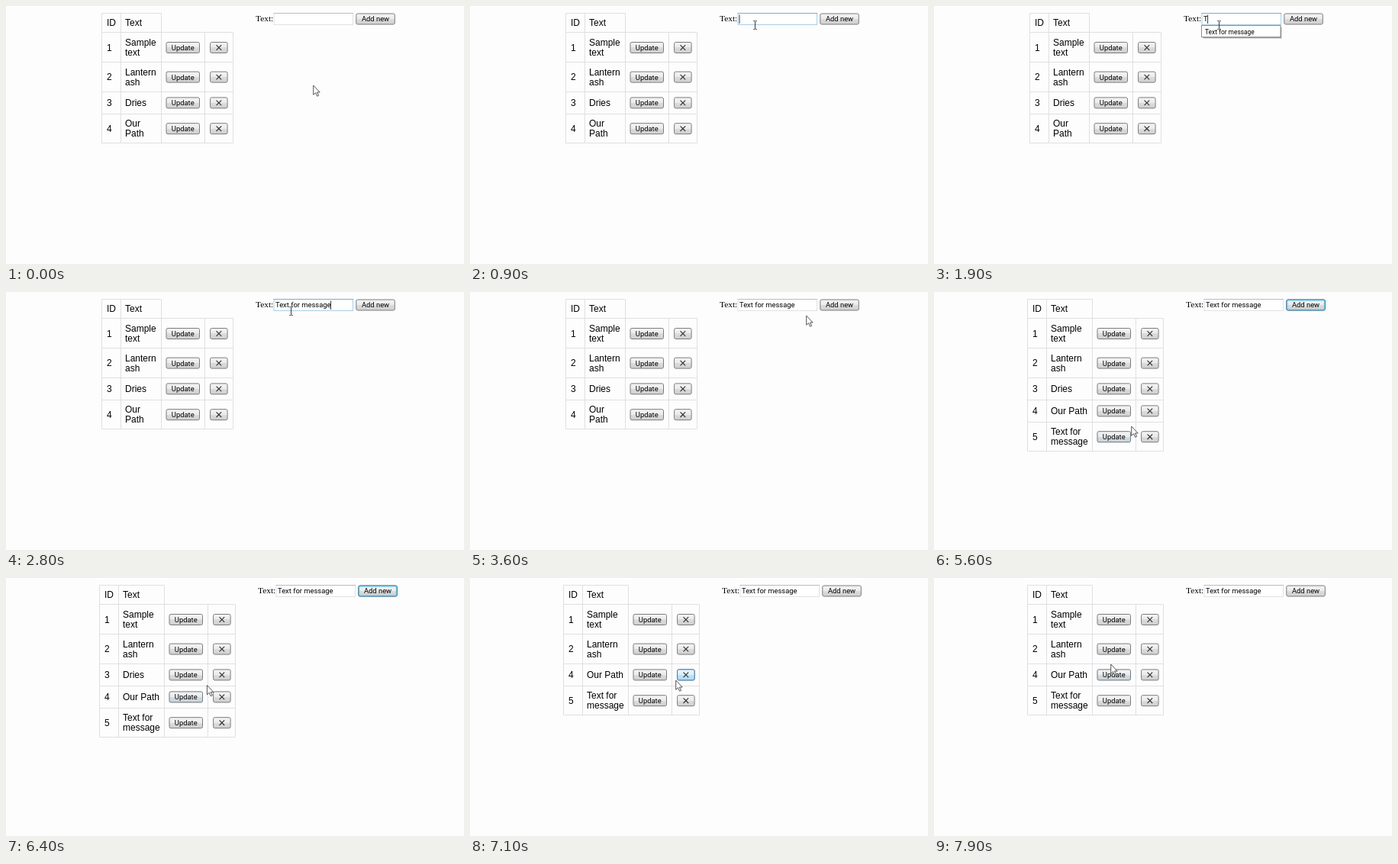
An HTML page for the animation above (8 s loop, 600x338 px).

```html
<!DOCTYPE html>
<html lang="en">
<head>
<meta charset="utf-8">
<style>
  html, body { margin: 0; width: 100%; height: 100%; overflow: hidden; background: #fefdfe; }
  svg { display: block; }
  text { white-space: pre; fill: #000; }
  .cell { font: 12px "Liberation Sans", Arial, sans-serif; }
  .ui { font: 9.4px Roboto, sans-serif; }
  .hint { font: 8.4px Roboto, sans-serif; }
  .label { font: 11.4px "Liberation Serif", "Times New Roman", serif; }
  .mid { text-anchor: middle; }
</style>
</head>
<body>
<svg width="600" height="338" viewBox="0 0 600 338">
  <defs>
    <linearGradient id="face" x2="0" y2="1">
      <stop stop-color="#f4f4f4"/><stop offset=".5" stop-color="#ebebeb"/>
      <stop offset=".5" stop-color="#dddddd"/><stop offset="1" stop-color="#cfcfcf"/>
    </linearGradient>
    <linearGradient id="hot" x2="0" y2="1">
      <stop stop-color="#eaf6fd"/><stop offset=".5" stop-color="#d9f0fc"/>
      <stop offset=".5" stop-color="#bee6fd"/><stop offset="1" stop-color="#a7d9f5"/>
    </linearGradient>
  </defs>
  <g id="scene"></g>
</svg>
<script>
const LOOP = 8000, TICK = 100;
const MESSAGE = 'Text for message';
const ADDED = 4200, REMOVED = 6900;
const scene = document.getElementById('scene');
const ruler = document.createElement('canvas').getContext('2d');

// Pointer path: time, x, y
const PATH = [
  [0, 403, 104], [500, 365, 29], [600, 365, 29], [900, 373, 25], [3400, 373, 25],
  [3600, 441, 31], [3700, 452, 28], [3900, 480, 19], [4200, 480, 19], [4500, 449, 27],
  [5000, 297, 115], [5400, 245, 184], [5600, 259, 176], [5900, 223, 177],
  [6600, 280, 126], [7000, 280, 128], [7100, 270, 134], [7700, 234, 122], [7900, 232, 113]
];
const TYPED = [[0, ''], [1800, 'T'], [2100, 'Te'], [2400, 'Tex'], [2600, 'Text'], [2800, MESSAGE]];

const within = (t, from, to) => t >= from && t < to;
const snap = v => Math.floor(v) + .5;

function pointer(t) {
  const i = PATH.findIndex(p => p[0] > t);
  if (i < 0) return PATH[PATH.length - 1].slice(1);
  if (i === 0) return PATH[0].slice(1);
  const [t0, x0, y0] = PATH[i - 1], [t1, x1, y1] = PATH[i];
  const k = (t - t0) / (t1 - t0);
  return [x0 + (x1 - x0) * k, y0 + (y1 - y0) * k];
}

const rect = (x, y, w, h, attrs) =>
  `<rect x="${x}" y="${y}" width="${w}" height="${h}" ${attrs}/>`;
const line = (d, color, width = 1) =>
  `<path d="${d}" fill="none" stroke="${color}" stroke-width="${width}"/>`;
const text = (x, y, s, cls) => `<text x="${x}" y="${y}" class="${cls}">${s}</text>`;

// Hover glow fades for two ticks after the pointer leaves
function glow(t, x, y, w, h) {
  const over = [1, .9, .15].map((level, i) => {
    const [px, py] = pointer(t - i * TICK);
    return px >= x && px <= x + w && py >= y && py <= y + h ? level : 0;
  });
  return Math.max(...over);
}

function button(t, x, cy, w, label, focused) {
  const y = cy - 7, h = 14, hot = glow(t, x, y, w, h);
  let s = rect(x, y, w, h, 'rx="2" fill="url(#face)" stroke="#7c7c7c"');
  if (hot) s += rect(x, y, w, h, `rx="2" fill="url(#hot)" stroke="#3c7fb1" opacity="${hot}"`);
  if (focused) {
    s += rect(x, y, w, h, 'rx="2" fill="none" stroke="#3c7fb1"') +
      rect(x + 1, y + 1, w - 2, h - 2, 'rx="1" fill="none" stroke="#5ccbef"');
  }
  const cx = x + w / 2;
  return s + (label
    ? text(cx, cy + 3.4, label, 'ui mid')
    : line(`M${cx - 3.3} ${cy - 3.3}l6.6 6.6m0 -6.6l-6.6 6.6`, '#333', 1.2));
}

function table(t) {
  const wide = t >= ADDED;
  const [x0, x1, x2, x3, x4] = wide ? [122.5, 147, 207, 264, 300.5] : [125.5, 150, 203, 260, 297];
  const rows = [
    [1, 'Sample', 'text'], [2, 'Lantern', 'ash'], [3, 'Dries'],
    wide ? [4, 'Our Path'] : [4, 'Our', 'Path']
  ];
  if (wide) rows.push([5, 'Text for', 'message']);
  if (t >= REMOVED) rows.splice(2, 1);

  const grid = (xs, y, h) => {
    const top = snap(y), bottom = snap(y + h), left = snap(xs[0]), right = snap(xs[xs.length - 1]);
    return line(`M${left} ${top}H${right}M${left} ${bottom}H${right}` +
      xs.map(x => `M${snap(x)} ${top}V${bottom}`).join(''), '#dfdfe2');
  };
  let s = grid([x0, x1, x2], 9, 25.8) +
    text(x0 + 6.5, 26, 'ID', 'cell') + text(x1 + 6, 26, 'Text', 'cell');
  let y = 34.8;
  for (const [id, ...words] of rows) {
    const h = words.length > 1 ? 38.6 : 29, mid = y + h / 2;
    s += grid([x0, x1, x2, x3, x4], y, h);
    s += text(x0 + 6.5, mid + 4.6, id, 'cell');
    words.forEach((word, i) => {
      s += text(x1 + 6, mid + 4.6 + 13 * (i - (words.length - 1) / 2), word, 'cell');
    });
    s += button(t, x2 + 7, mid + .4, 43.5, 'Update') + button(t, x3 + 7.6, mid + .4, 22.5);
    y += h;
  }
  return s;
}

function form(t) {
  const dx = t >= ADDED ? 3 : 0, x = 351 + dx;
  const active = within(t, 900, 3500);
  const typed = TYPED.filter(step => step[0] <= t).pop()[1];
  let s = text(327 + dx, 20.4, 'Text:', 'label');
  s += rect(x, 9.5, 103.5, 15, `fill="#fff" stroke="${active ? '#a9cde6' : '#e0e1e6'}"`);
  s += line(`M${x - .5} 9.5h104.5`, active ? '#79acd0' : '#b9bbc0');
  s += text(x + 2, 20.4, typed, 'ui');
  if (within(t, 900, 1500) || within(t, 1800, 3200)) {
    ruler.font = '9.4px Roboto, sans-serif';
    const caret = x + 2 + ruler.measureText(typed).width;
    s += line(`M${caret} 11.5v11.5`, '#222', .9);
  }
  if (within(t, 1800, 2800)) {
    s += rect(353, 28, 103, 15, 'fill="#000" opacity=".12"') +
      rect(352, 27, 103, 15, 'fill="#000" opacity=".3"') +
      rect(350.5, 25.5, 103.5, 15.2, 'fill="#fff" stroke="#8e8e8e"') +
      text(355, 36.8, MESSAGE, 'hint');
  }
  return s + button(t, 458.8 + dx, 17, 50.5, 'Add new', within(t, ADDED, 6700));
}

function cursor(t) {
  const [x, y] = pointer(t);
  const shape = within(t, 800, 3500)
    ? line('M-1.7 -5.5h1.5l.7 .7l.7 -.7h1.5M.5 -4.8v9.6M-1.7 5.5h1.5l.7 -.7l.7 .7h1.5', '#222', .9)
    : '<path d="M-.3 0V12.3l2.8-2.6 2.1 4.5 2-.9-2.1-4.3h3.7z" fill="#fafafa" stroke="#444" stroke-width=".9"/>';
  return `<g transform="translate(${x} ${y})">${shape}</g>`;
}

let last = -1;
function frame(now) {
  const t = Math.floor((now % LOOP) / TICK) * TICK;
  if (t !== last) {
    scene.innerHTML = table(t) + form(t) + cursor(t);
    last = t;
  }
  requestAnimationFrame(frame);
}
frame(0);
</script>
</body>
</html>
```
